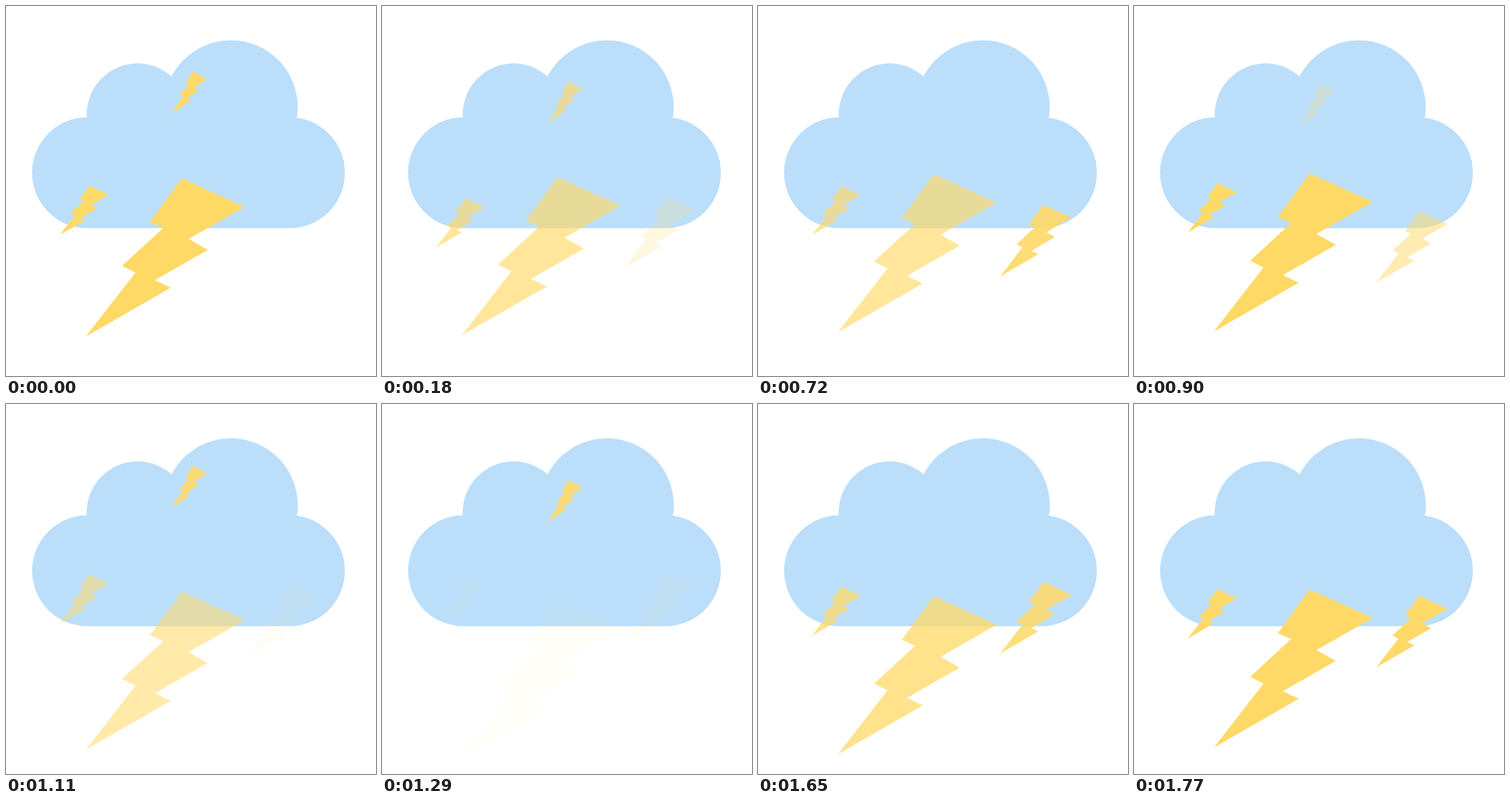
An HTML page with a canvas that plays this animation: 440 px wide and 440 px high, repeating every 1.8 s.

```html
<!DOCTYPE html>
<html lang="en">
<head>
<meta charset="utf-8">
<title>Thunder cloud</title>
<style>
  html, body { margin: 0; width: 100%; height: 100%; overflow: hidden; background: #fff; }
  canvas { display: block; width: 440px; height: 440px; }
</style>
</head>
<body>
<canvas id="stage" width="440" height="440"></canvas>
<script>
const ctx = document.getElementById('stage').getContext('2d');
const LOOP = 1800, STEP = 30;

// Bolt outline, origin at the left end of the tip and the top of the head
const OUTLINE = [[114, 0], [189, 34], [122, 72], [145, 85], [82, 121], [101, 130],
                 [0, 188], [59, 112], [43, 104], [92, 59], [76, 52]];

const wave = (t, period, peak) => (1 + Math.cos(2 * Math.PI * (t - peak) / period)) / 2;

// A single rise and fall of 900 ms around a peak
const pulse = (t, peak) => Math.abs(t - peak) < 450 ? wave(t, 900, peak) : 0;

const BOLTS = [
  { x: 197, sx: 0.22, sy: 0.266,
    alpha: t => pulse(t, 0) + pulse(t, 1200),
    path: [[0, 78], [180, 89.5], [450, 104], [750, 104], [900, 93], [1110, 73.5], [1500, 116], [1800, 124]] },
  { x: 64, sx: 0.308, sy: 0.31,
    alpha: t => wave(t, 900, 0),
    path: [[0, 214], [180, 229], [540, 217.5], [900, 211], [1110, 203], [1500, 213], [1770, 220.5], [1800, 221]] },
  { x: 288, sx: 0.45, sy: 0.452,
    alpha: t => wave(t, 1200, 600),
    path: [[0, 224], [180, 227], [540, 228.3], [900, 244], [1110, 215], [1440, 195], [1500, 196.5], [1620, 208], [1770, 228.3], [1800, 231]] },
  { x: 95, sx: 1, sy: 1,
    alpha: t => wave(t, 900, 0),
    path: [[0, 205], [180, 203.5], [540, 201.5], [900, 199], [1080, 219], [1110, 223], [1240, 234], [1500, 224], [1620, 229], [1770, 220.5], [1800, 218]] }
];

// Smooth curve through the points that turns only at the points
function along(path, t) {
  const slope = i => (path[i + 1][1] - path[i][1]) / (path[i + 1][0] - path[i][0]);
  const tangent = i => {
    if (i === 0) return slope(0);
    if (i === path.length - 1) return slope(i - 1);
    const a = slope(i - 1), b = slope(i);
    return a * b > 0 ? 2 * a * b / (a + b) : 0;
  };
  let i = 0;
  while (i < path.length - 2 && t > path[i + 1][0]) i++;
  const [t0, y0] = path[i], [t1, y1] = path[i + 1];
  const span = t1 - t0, u = (t - t0) / span, v = 1 - u;
  return y0 * v * v * (1 + 2 * u) + y1 * u * u * (3 - 2 * u)
       + span * u * v * (tangent(i) * v - tangent(i + 1) * u);
}

function drawCloud() {
  ctx.fillStyle = '#bbdefb';
  ctx.beginPath();
  for (const [x, y, r] of [[97, 198.3, 66], [156.5, 128.8, 60.5], [267.5, 120.3, 79.5], [337, 198.3, 66]]) {
    ctx.moveTo(x + r, y);
    ctx.arc(x, y, r, 0, 2 * Math.PI);
  }
  ctx.rect(97, 133, 240, 131.3);
  ctx.fill();
}

function drawBolt(bolt, t) {
  const y = along(bolt.path, t);
  ctx.globalAlpha = bolt.alpha(t);
  ctx.fillStyle = '#ffd966';
  ctx.beginPath();
  for (const [px, py] of OUTLINE) ctx.lineTo(bolt.x + px * bolt.sx, y + py * bolt.sy);
  ctx.fill();
  ctx.globalAlpha = 1;
}

function draw(t) {
  ctx.fillStyle = '#fff';
  ctx.fillRect(0, 0, 440, 440);
  drawCloud();
  for (const bolt of BOLTS) drawBolt(bolt, t);
}

const start = performance.now();
function tick() {
  const t = (performance.now() - start) % LOOP;
  draw(Math.floor(t / STEP) * STEP);
  requestAnimationFrame(tick);
}
tick();
</script>
</body>
</html>
```
